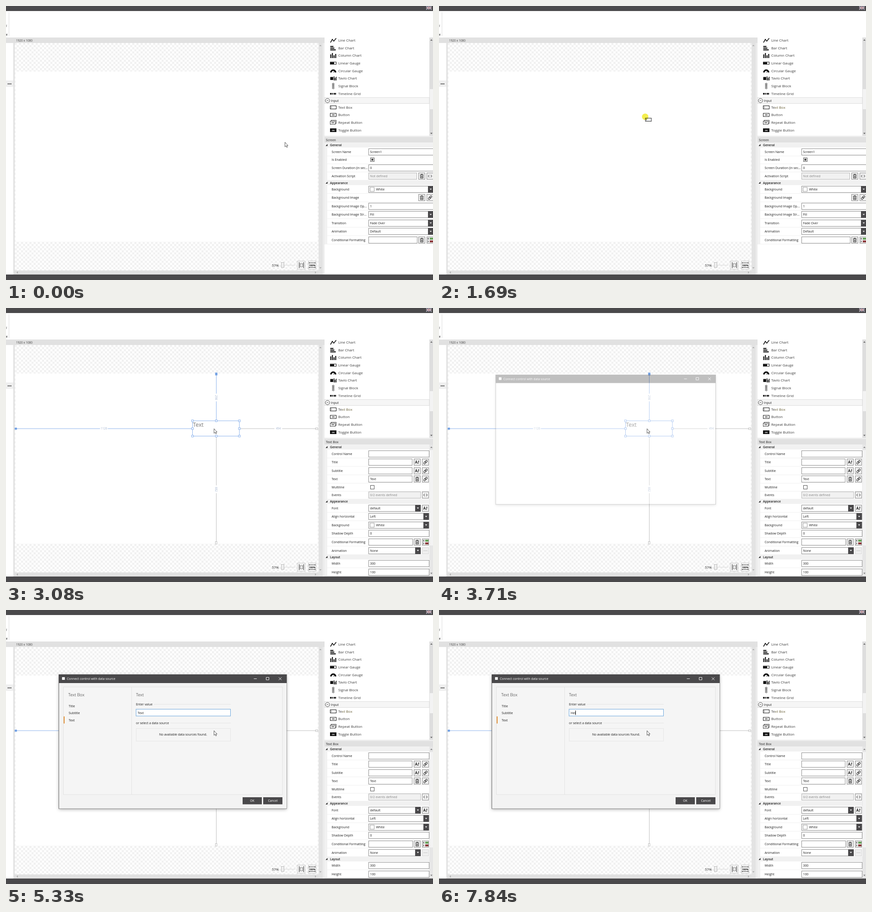
Animation of 933 by 600 pixels, one loop 7.99 s. Source, as an HTML page:

```html
<!DOCTYPE html>
<html lang="en">
<head>
<meta charset="utf-8">
<title>Screen designer</title>
<style>
  html, body { margin: 0; width: 100%; height: 100%; overflow: hidden; background: #fff; }
  svg { display: block; width: 933px; height: 600px; }
  text { font: 6.88px "Open Sans", "Noto Sans", sans-serif; fill: #1c1c1c; white-space: pre; }
  .tool { font-size: 7.85px; fill: #3c3c3c; }
  .bold { font-size: 6.75px; font-weight: 600; }
  .head { font-size: 6.75px; font-weight: 600; fill: #505050; }
  .size { font-size: 6.4px; fill: #444; }
  .zoom { font-size: 7.6px; }
  .light { font-size: 9.4px; font-weight: 300; }
  .tiny { font-size: 4.2px; font-weight: 700; }
  .percent { font-size: 5.4px; font-weight: 700; }
  .canvas { font-size: 12.3px; fill: #777; }
  .measure { font-size: 6.2px; fill: #a3b4cf; }
  .muted { fill: #858585; }
  .white { fill: #fff; }
  .mid { text-anchor: middle; }
</style>
</head>
<body>
<svg id="stage" viewBox="0 0 933 600" xmlns="http://www.w3.org/2000/svg"></svg>
<script>
const LOOP = 7990;
const DARK = '#4a494b', GREY = '#e1e1e1';

const rect = (x, y, w, h, fill, stroke = 'none', sw = 1) =>
  `<rect x="${x}" y="${y}" width="${w}" height="${h}" fill="${fill}" stroke="${stroke}" stroke-width="${sw}"/>`;
const path = (d, stroke, sw = 1, fill = 'none') =>
  `<path d="${d}" fill="${fill}" stroke="${stroke}" stroke-width="${sw}"/>`;
const text = (x, y, s, cls = '') => `<text x="${x}" y="${y}" class="${cls}">${s}</text>`;
const group = (id, body) => `<g id="${id}">${body}</g>`;
const at = (x, y, body) => `<g transform="translate(${x} ${y})">${body}</g>`;
const triangle = (x, y, dir, fill) => {
  const turn = { up: 0, right: 90, down: 180, left: 270 }[dir];
  return `<path transform="translate(${x} ${y}) rotate(${turn})" d="M-2.4 1.3L0 -1.4L2.4 1.3Z" fill="${fill}"/>`;
};

// ---- Window frame and canvas ----
function flag() {
  return rect(918, 0, 12, 8, '#3a3c52') + path('M918 0L930 8M930 0L918 8', '#d8d4d8', 1.3) +
    path('M924 0V8M918 4H930', '#e6e2e4', 2.4) + path('M924 0V8M918 4H930', '#9c5a66', 1);
}

function shell() {
  return rect(0, 0, 933, 600, '#fff') + rect(0, 0, 933, 11, DARK) + flag() +
    path('M6.5 13V66', '#ddd') + text(-1.6, 45, 'y') + text(-.3, 64.5, 'e') +
    rect(0, 69, 696, 519, GREY) + rect(0, 81, 16, 507, '#fff') +
    rect(0, 163, 16, 14, '#efefef') +
    [4.7, 7.7, 10.7].map(x => `<circle cx="${x}" cy="170.6" r="1.1" fill="#222"/>`).join('') +
    text(22, 77.5, '1920 x 1080', 'size') +
    rect(19, 81, 664, 498, 'url(#checker)') + rect(21, 143.5, 660, 372.5, '#fff') +
    rect(683, 81, 9, 507, '#e3e3e3') + rect(692, 81, 4, 507, '#ececec') +
    triangle(687, 86.5, 'up', '#aaa') + triangle(687, 573.5, 'down', '#aaa') +
    triangle(24.5, 583.5, 'left', '#aaa') + triangle(676.5, 583.5, 'right', '#aaa') +
    rect(0, 588, 933, 12, DARK);
}

function zoomBar() {
  return text(581, 570.6, '57%', 'zoom') + path('M608 567.5H632', '#d8d8d8') +
    rect(601.5, 561.5, 6, 11, '#eee', '#bcbcbc') +
    rect(636.5, 558.5, 17, 18, '#f8f8f8', '#c4c4c4') + rect(660.5, 558.5, 17, 18, '#f8f8f8', '#c4c4c4') +
    path('M640.5 561V574M650.5 561V574', '#333', 1) + path('M640 563.5H651M640 571.5H651', '#777', .7) +
    path('M642.5 567V565.5H644.5M646.5 565.5H648.5V567M648.5 568V569.5H646.5M644.5 569.5H642.5V568', '#222', .8) +
    path('M662 562.5H676M662 572.5H676M662.5 561V564M675.5 561V564M662.5 571V574M675.5 571V574', '#333', .9) +
    text(669, 569.5, '100%', 'percent mid');
}

// ---- Toolbox ----
const tile = (y, label, fill, ink) => rect(708.5, y - 3.5, 13, 7, fill, '#111') + text(715, y + 1.6, label, 'tiny mid ' + ink);
const icons = {
  line: y => path(`M709 ${y + 5}L713 ${y - 2}L716.3 ${y + 2}L721.5 ${y - 4.5}`, '#111', 1.6),
  bar: y => [7, 9, 12].map((w, i) => rect(708.5, y - 4.5 + i * 3.7, w, 2.3, '#111')).join(''),
  column: y => [8, 11, 6, 9].map((h, i) => rect(708.5 + i * 3.6, y + 5.5 - h, 2.2, h, '#111')).join(''),
  linear: y => rect(708.5, y - 2.5, 13, 5, '#fff', '#111') + rect(709, y - 2, 8, 4, '#111'),
  circular: y => path(`M710 ${y + 3.5}A5 5 0 0 1 720 ${y + 3.5}`, '#111', 3.6) + path(`M715 ${y + 3.5}L718.5 ${y + 1}`, '#111'),
  sheet: y => rect(708.5, y - 3, 6.5, 6.5, '#111') + [9, 6, 8].map((h, i) => rect(716 + i * 2.4, y + 4.5 - h, 1.5, h, '#111')).join(''),
  signal: y => [-4.2, 0, 4.2].map(d => `<circle cx="715" cy="${y + d}" r="1.9" fill="#fff" stroke="#222" stroke-width="1"/>`).join(''),
  timeline: y => [708, 711.8, 715.6, 719].map((x, i) => rect(x, y - 1.5, i % 2 ? 2.2 : 3, 3.4, '#111')).join(''),
  box: y => rect(708.5, y - 3.5, 13, 7, '#fff', '#111') + path(`M710.8 ${y - 2}V${y + 2}`, '#333', .8),
  button: y => tile(y, 'OK', '#fff', ''),
  repeat: y => rect(710.5, y - 5, 11, 7, '#fff', '#111', .8) + rect(708.5, y - 3, 11, 7, '#fff', '#111', .8) + text(714, y + 2, 'OK', 'tiny mid'),
  toggle: y => tile(y, 'OK', '#111', 'white'),
};

function toolbox() {
  const tools = [
    ['line', 75, 'Line Chart'], ['bar', 92, 'Bar Chart'], ['column', 108.5, 'Column Chart'],
    ['linear', 125.2, 'Linear Gauge'], ['circular', 142, 'Circular Gauge'], ['sheet', 158.5, 'Tavlo Chart'],
    ['signal', 175.2, 'Signal Block'], ['timeline', 192, 'Timeline Grid'],
    ['box', 222, 'Te<tspan id="tint">xt Box</tspan>'], ['button', 238.5, 'Button'],
    ['repeat', 255.2, 'Repeat Button'], ['toggle', 272, 'Toggle Button'],
  ];
  return rect(696, 69, 237, 215, '#fff') +
    tools.map(([icon, y, label]) => icons[icon](y) + text(726, y + 2.9, label, 'tool')).join('') +
    rect(696, 200.5, 229, 13, '#f6f6f6', '#dedede') +
    '<circle cx="702.5" cy="207.2" r="4.7" fill="#fff" stroke="#333" stroke-width=".9"/>' +
    path('M700.3 208.3L702.5 206.1L704.7 208.3', '#333', 1) + text(710, 209.7, 'Input') +
    rect(925, 69, 8, 215, '#dedede') + rect(926, 182, 7, 44, '#f3f3f3') +
    triangle(929.5, 74.5, 'up', '#555') + triangle(929.5, 279, 'down', '#555');
}

// ---- Property panel ----
const section = (y, name) => rect(696, y - 5.5, 237, 10.5, '#f1f1f1') +
  path(`M702.5 ${y - 2.5}V${y + 1.7}H698.3Z`, 'none', 0, '#222') + text(708, y + 2.4, name, 'bold');
const label = (y, name) => text(711.5, y + 2.5, name) + path(`M702 ${y + 9.2}H933`, '#f0f0f0');
const edge = y => Math.round(y - 7.5) + .5;
const field = (y, right, value = '', off = false) =>
  rect(792.5, edge(y), right - 792.5, 14, off ? '#f1f1f1' : '#fff', off ? '#b5b5b5' : '#8c8c8c') +
  text(795.5, y + 2.5, value, off ? 'muted' : '');
const combo = (y, right, value, swatch) => field(y, right, swatch ? '' : value) +
  rect(right - 12, edge(y) - .5, 12, 15, DARK) + triangle(right - 6, y, 'down', '#fff') +
  (swatch ? rect(795.5, edge(y) + 2.5, 9, 9, '#fff', '#999') + text(808.5, y + 2.5, value) : '');
const check = (y, on) => rect(796.5, edge(y) + 3, 8, 8, '#fff', '#555') + (on ? rect(798.5, edge(y) + 5, 4, 4, '#333') : '');

const glyphs = {
  trash: path('M3.5 4.2H11.5M6 3.8V3H9V3.8M4.6 5V11.5H10.4V5M6.5 6V10.3M8.5 6V10.3', '#222', .95),
  link: `<g transform="rotate(-45 7.5 7)" fill="none" stroke="#222"><rect x="2.6" y="5.3" width="5.4" height="3.6" rx="1.8"/><rect x="7" y="5.3" width="5.4" height="3.6" rx="1.8"/></g>`,
  code: path('M6 4.5L3.3 7L6 9.5M9 4.5L11.7 7L9 9.5', '#222', 1),
  font: path('M3.2 10L5.4 4L7.6 10M4 8H7M10.6 3.5L9.4 10.5M9.4 6.5L11.4 5.5', '#222', 1.1),
  rules: rect(7, 2, 7, 4, '#5d9e4f') + rect(7, 8, 7, 4, '#862f31') + path('M2 3H5M2 5H5M2 8.3L4.6 10L2 11.7', '#222', .9),
  dots: [4.5, 7.5, 10.5].map(x => `<circle cx="${x}" cy="7" r=".8" fill="#aaa"/>`).join(''),
};
const button = (x, y, glyph) =>
  at(Math.floor(x), edge(y), rect(.5, 0, 14, 14, '#efefef', glyph === 'dots' ? '#d5d5d5' : '#8c8c8c') + glyphs[glyph]);

const panel = (title, body) => rect(696, 284, 237, 304, '#fff') + rect(696, 284, 237, 3, '#ededed') +
  rect(696, 287, 237, 12, GREY) + text(699, 295.6, title, 'head') + body;

function screenProps() {
  const names = [[319.2, 'Screen Name'], [336.5, 'Is Enabled'], [354.3, 'Screen Duration (in sec...'],
    [372.5, 'Activation Script'], [401.2, 'Background'], [419.7, 'Background Image'],
    [438.2, 'Background Image Op...'], [456.7, 'Background Image Str...'], [475.2, 'Transition'],
    [493.7, 'Animation'], [512.2, 'Conditional Formatting']];
  return panel('Screen', rect(696, 299, 6, 223, '#f1f1f1') + section(304.8, 'General') + section(387.2, 'Appearance') +
    names.map(n => label(...n)).join('') +
    field(319.2, 936, 'Screen1') + check(336.5, true) + field(354.3, 936, '0') +
    field(372.5, 897.5, 'Not defined', true) + button(901, 372.5, 'trash') + button(919.5, 372.5, 'code') +
    combo(401.2, 934, 'White', true) + button(901, 419.7, 'trash') + button(919.5, 419.7, 'link') +
    field(438.2, 936, '1') + combo(456.7, 934, 'Fill') + combo(475.2, 934, 'Fade Over') + combo(493.7, 934, 'Default') +
    field(512.2, 898.5) + button(901, 512.2, 'trash') + button(919.5, 512.2, 'rules') +
    path('M696 586.5H933', '#ddd'));
}

function boxProps() {
  const names = [[319.2, 'Control Name'], [337.7, 'Title'], [356.2, 'Subtitle'], [374.5, 'Text'], [392, 'Multiline'],
    [409.5, 'Events'], [438.2, 'Font'], [456.7, 'Align horizontal'], [475.2, 'Background'], [493.7, 'Shadow Depth'],
    [512.2, 'Conditional Formatting'], [531, 'Animation'], [559.7, 'Width'], [578.2, 'Height']];
  return panel('Text Box', rect(696, 299, 6, 289, '#f1f1f1') +
    section(304.8, 'General') + section(424, 'Appearance') + section(545.5, 'Layout') +
    names.map(n => label(...n)).join('') +
    field(319.2, 924.5) + [337.7, 356.2].map(y => field(y, 887.5) + button(891, y, 'font') + button(909.5, y, 'link')).join('') +
    field(374.5, 887.5, 'Text') + button(891, 374.5, 'trash') + button(909.5, 374.5, 'link') + check(392) +
    field(409.5, 906, '0/2 events defined', true) + button(909.5, 409.5, 'code') +
    combo(438.2, 906, 'default') + button(909.5, 438.2, 'font') + combo(456.7, 924, 'Left') +
    combo(475.2, 924, 'White', true) + field(493.7, 924.5, '0') +
    field(512.2, 888.5) + button(891.5, 512.2, 'trash') + button(909.5, 512.2, 'rules') +
    combo(531, 906, 'None') + button(909.5, 531, 'dots') + field(559.7, 924.5, '300') + field(578.2, 924.5, '100') +
    rect(925, 299, 8, 289, '#e6e6e6') + rect(926, 311, 7, 209, '#f3f3f3') +
    triangle(929.5, 305, 'up', '#777') + triangle(929.5, 581, 'down', '#777') + rect(696, 586, 237, 2, '#e4e4e4'));
}

// ---- Dropped control with its guides ----
function control() {
  const blue = '#8db3ec', grey = '#bfbfbf';
  const handles = [407.5, 459.5, 510].flatMap(x => [247, 264, 280.5].map(y => [x, y])).filter(([x, y]) => x !== 459.5 || y !== 264);
  const measure = (x, y, s, turn) => `<g transform="translate(${x} ${y}) rotate(${turn})">` +
    rect(-8.5, -4, 17, 8, '#fff') + text(0, 2.2, s, 'measure mid') + '</g>';
  return path('M24 264.2H407M459.5 147V247', blue) + path('M510 264.2H677M459.5 281V512', grey) +
    rect(19, 262, 5, 4.5, '#76a3e4') + rect(457, 141.5, 5, 6, '#76a3e4') +
    rect(676.5, 262.5, 5, 3.5, '#fff', grey) + rect(457.5, 511.5, 3.5, 5.5, '#fff', grey) +
    measure(214, 264, '1126', 0) + measure(595, 264, '494', 0) + measure(459.5, 196, '298', 90) + measure(459.5, 397, '682', 90) +
    rect(407.5, 247, 102.5, 33.5, '#fff', blue) + text(408.3, 260, 'Text', 'canvas') +
    handles.map(([x, y]) => rect(x - 2, y - 2, 4, 4, '#fff', blue)).join('');
}

// ---- Dialog ----
function dialog() {
  const push = (x, s) => rect(x, 410, 42, 15.5, DARK) + text(x + 21, 420.4, s, 'white mid');
  const content = rect(116, 160, 497, 274.5, '#f3f3f3') + rect(125.5, 168.5, 478.5, 235.5, '#f5f5f5', '#e2e2e2') +
    path('M274.5 169V404', '#e2e2e2') + text(136, 188.5, 'Text Box', 'light') +
    text(137, 212.7, 'Title') + text(137, 228.2, 'Subtitle') + text(137, 243.6, 'Text') +
    rect(126, 233, 2, 15.5, '#e28f38') + text(284, 189, 'Text', 'light') +
    text(284, 209.2, 'Enter value') + path('M323 206.5H491M359 247.5H491', '#e4e4e4') +
    rect(284.2, 217.2, 206.3, 14.9, '#fff', '#6aa6dc') + text(284, 249.7, 'or select a data source') +
    rect(284.5, 259.5, 206, 27.5, '#f5f5f5', '#e6e6e6') + text(387, 275.3, 'No avaliable data sources found.', 'mid') +
    '<text id="typed" x="287.8" y="227.6"></text>' + `<rect id="caret" y="220" width="1" height="10" fill="#111"/>` +
    push(517, 'OK') + push(562, 'Cancel');
  return `<rect x="115.5" y="141" width="497.5" height="294" fill="#fff" filter="url(#shadow)"/>` +
    rect(115.5, 141.5, 497.5, 293.5, '#fff', '#5a5a5a', .9) + rect(115.3, 141, 498, 19, DARK) +
    rect(122.5, 147, 6, 6, '#fff') + text(133, 153, 'Connect control with data source', 'white') +
    path('M541.5 150.5H548M568.5 147.5H574.5V153H568.5ZM596 147.5L602 153.5M602 147.5L596 153.5', '#fff', .9) +
    group('content', content);
}

// ---- Pointers ----
const pointers =
  group('arrow', path('M.5 .3V10.3L2.8 8.2L4.4 11.7L6 11L4.4 7.6H7.2Z', '#333', .8, '#fff')) +
  group('drag', rect(.5, 3, 13, 7, '#eceef0', '#333') + path('M2.5 4.5V8.5', '#333', .8) +
    '<circle r="7" fill="#f4ee4e" style="mix-blend-mode:multiply"/>') +
  group('resize', path('M-4.8 -4.8H-.8L-2 -3.4L3.4 2L4.8 .8V4.8H.8L2 3.4L-3.4 -2L-4.8 -.8Z', '#333', .9, '#fff')) +
  group('click', '<circle r="7" fill="#f4ee4e" style="mix-blend-mode:multiply"/>');

stage.innerHTML = `<defs>
  <pattern id="checker" x="19" y="81" width="9.17" height="9.17" patternUnits="userSpaceOnUse" viewBox="0 0 8 8">
    <rect width="8" height="8" fill="#fff"/><path d="M0 0H4V8H8V4H0Z" fill="#f1f1f1"/></pattern>
  <filter id="shadow" x="-5%" y="-5%" width="110%" height="112%"><feDropShadow dx="0" dy="2" stdDeviation="3.5" flood-opacity=".3"/></filter>
  </defs>` + shell() + zoomBar() + toolbox() + group('screenPanel', screenProps()) +
  group('boxPanel', boxProps()) + group('control', control()) + group('dialog', dialog()) + pointers;

// ---- Timeline ----
const el = id => document.getElementById(id);
const show = (id, on) => { el(id).style.display = on ? '' : 'none'; };
const move = (id, [x, y]) => el(id).setAttribute('transform', `translate(${x} ${y})`);
const during = (t, a, b) => t >= a && t < b;
const latest = (t, keys) => keys.filter(k => t >= k[0]).pop();

// Position after a number of equal jumps along a polyline.
function walk(t, from, to, steps, points, ease = u => u) {
  const jumps = Math.floor((t - from) / ((to - from) / (steps - 1)) + 1.1);
  const u = ease(Math.min(1, Math.max(0, jumps / steps))) * (points.length - 1);
  const i = Math.min(points.length - 2, Math.floor(u));
  return points[i].map((v, axis) => v + (points[i + 1][axis] - v) * (u - i));
}
const smooth = u => u * u * (3 - 2 * u);

const dragPath = [[741, 221], [684, 220], [606, 216.5], [535, 222], [470, 239], [431, 246]];
// time, value, caret x (0 hides it)
const typing = [
  [3930, 'Text', 299], [4230, 'Text', 0], [4780, 'Text', 299], [5330, 'Text', 0],
  [5650, 'Tex', 297.5], [5800, 'Te', 294], [5950, 'T', 291], [6120, '', 287], [6670, '', 0],
  [6820, 'H', 292], [7430, 'H', 0], [7600, 'He', 296], [7840, 'Hel', 298],
];
// time, scale, opacity
const opening = [[3710, .966, .35], [3770, .985, .68], [3850, 1, 1]];

function render(t) {
  const dropped = t >= 2470;
  show('screenPanel', !dropped);
  show('boxPanel', dropped);
  show('control', dropped);
  el('tint').style.fill = t >= 1000 ? '#6a6138' : '';

  show('arrow', t < 1000 || t >= 2850);
  move('arrow', t < 1000 ? walk(t, 70, 770, 10, [[609, 298], [741, 221]], smooth)
    : walk(t, 2850, 3080, 4, [[407, 246], [454, 264]]));
  show('drag', during(t, 1000, 2380));
  move('drag', t < 1840 ? walk(t, 1076, 1760, 10, dragPath)
    : walk(t, 1840, 2150, 5, [[431, 246], [420, 250], [408, 245]]));
  show('resize', during(t, 2380, 2850));
  move('resize', [407, 246]);
  show('click', during(t, 3460, 3540) || during(t, 3600, 3660));
  move('click', [454, 264]);

  const open = latest(t, opening);
  show('dialog', open);
  if (open) {
    const [, scale, opacity] = open;
    el('dialog').setAttribute('transform', `translate(364.25 288) scale(${scale}) translate(-364.25 -288)`);
    el('dialog').setAttribute('opacity', opacity);
  }
  const entry = latest(t, typing);
  show('content', entry);
  if (entry) {
    const [, value, caretX] = entry;
    el('typed').textContent = value;
    show('caret', caretX);
    el('caret').setAttribute('x', caretX);
  }
}

const start = performance.now();
function frame() {
  render((performance.now() - start) % LOOP);
  requestAnimationFrame(frame);
}
frame();
</script>
</body>
</html>
```
